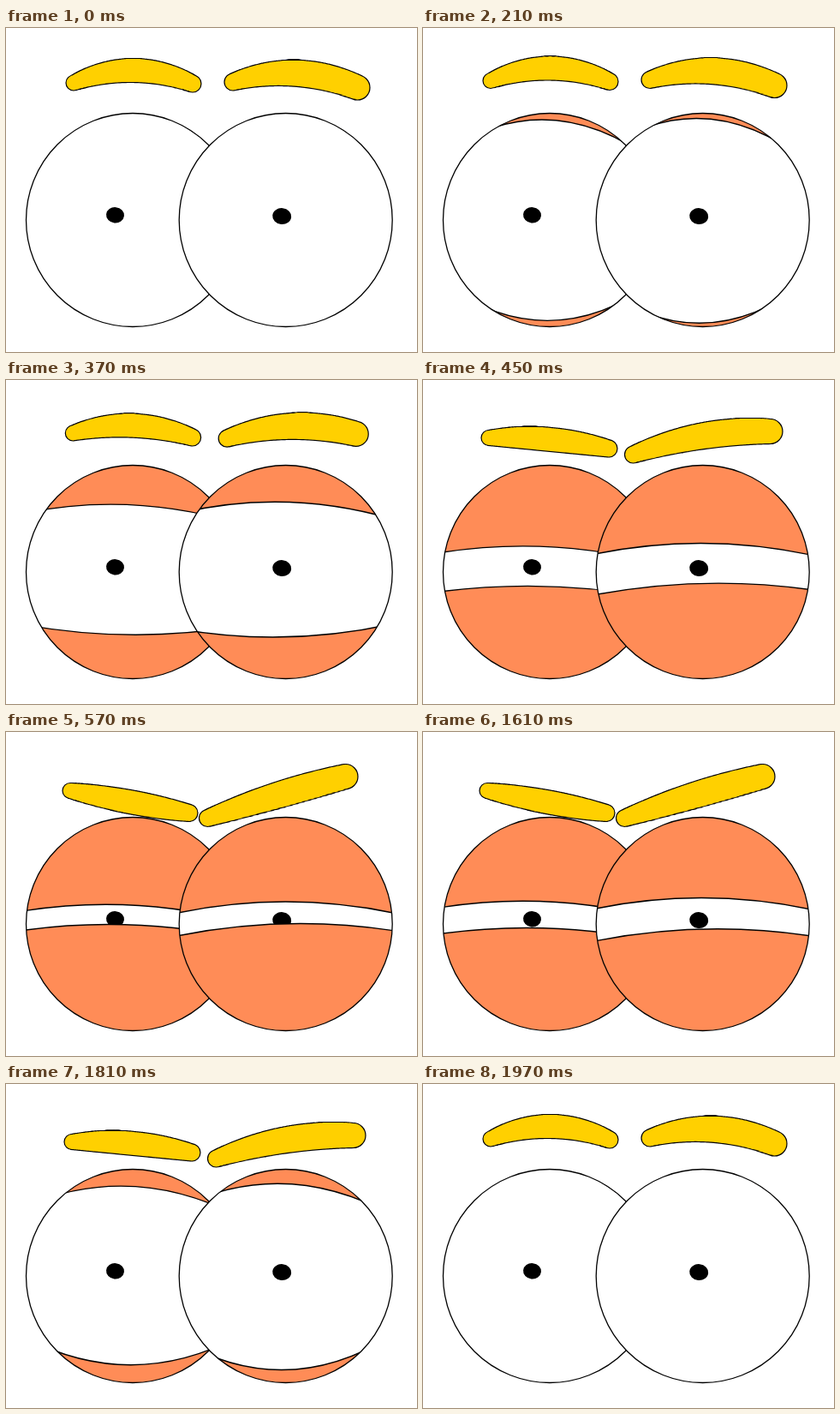
An HTML page with a canvas that plays this animation: 480x378 px, repeating every 2.47 s.

```html
<!DOCTYPE html>
<html lang="en">
<head>
<meta charset="utf-8">
<title>Suspicious eyes</title>
<style>
  html, body { margin: 0; width: 100%; height: 100%; overflow: hidden; background: #fff; }
  canvas { display: block; }
</style>
</head>
<body>
<canvas id="stage" width="480" height="378"></canvas>
<script>
const ctx = document.getElementById("stage").getContext("2d");
const LOOP = 2470, EYE_Y = 224, RADIUS = 124.5;
const SKIN = "#ff8c57", YELLOW = "#ffd000";

const mix = (a, b, k) => a.map((v, i) => v + (b[i] - v) * k);

// Lid heights at the middle of each eye: left upper, left lower, right upper, right lower.
const open = [95, 355, 95, 355];
const peek = [119.5, 327.7, 116.5, 333.5];
const half = [153, 278, 158, 276];
const narrow = [194.7, 240.8, 190.5, 237.3];
const loosen = [198, 229, 193.5, 230];
const squint = [202, 225, 198, 223.7];

// Brow spines, left then right: x0, y0, x1, y1, arch.
const arched = [79, 64, 218, 65, 15, 265, 63, 410.5, 69.5, 13.5];
const raised = arched.map((v, i) => i % 5 % 2 ? v - 5 : v);
const tilted = [77, 67.5, 217, 80, 4.5, 245.5, 87, 405.5, 60, 8];
const frown = [75, 68.5, 214, 94.5, 0, 235.5, 100.5, 396.5, 52, 2];

const poses = [
  [open, arched], [peek, raised], [narrow, tilted], [squint, frown],
  [loosen, frown], [half, frown], [peek, tilted], [open, arched]];

// Start time of each held drawing and its position along the poses.
const steps = [
  [0, 0], [210, .5], [290, 1], [370, 1.35], [410, 1.7], [450, 2], [490, 2.5], [570, 3],
  [1610, 4], [1650, 4.33], [1690, 4.67], [1730, 5], [1770, 6], [1850, 6.5], [1970, 7]];

// A lid edge curves more and tips differently the further it is from the eye's middle.
function drawLid(cx, y, tilt, swing) {
  const distance = Math.abs(y - EYE_Y), d = distance / 106;
  const upper = y < EYE_Y - 5;
  const arch = upper ? 13 + 18 * d ** 6 : 11 - 46 * d ** 2;
  const slope = tilt + swing * distance;
  const left = cx - 126, right = cx + 126, outerY = upper ? 80 : 370;
  ctx.beginPath();
  ctx.moveTo(left, y + arch - slope);
  ctx.quadraticCurveTo(cx, y - arch, right, y + arch + slope);
  ctx.lineTo(right, outerY);
  ctx.lineTo(left, outerY);
  ctx.closePath();
  ctx.fillStyle = SKIN;
  ctx.fill();
  ctx.lineWidth = 1.4;
  ctx.stroke();
}

function drawEye(cx, pupil, drawLids) {
  const ball = new Path2D();
  ball.arc(cx, EYE_Y, RADIUS, 0, Math.PI * 2);
  ctx.save();
  ctx.clip(ball);
  ctx.fillStyle = "#fff";
  ctx.fill(ball);
  ctx.beginPath();
  ctx.ellipse(...pupil, .1, 0, Math.PI * 2);
  ctx.fillStyle = "#000";
  ctx.fill();
  drawLids();
  ctx.restore();
  ctx.lineWidth = 1.3;
  ctx.stroke(ball);
}

// A brow is a row of circles along an arched spine, thickest near the middle.
function drawBrow([x0, y0, x1, y1, arch], r0, r1, bulge) {
  const shape = new Path2D();
  for (let i = 0; i <= 160; i++) {
    const t = i / 160, hump = 4 * t * (1 - t);
    const x = x0 + (x1 - x0) * t, y = y0 + (y1 - y0) * t - arch * hump;
    const r = r0 + (r1 - r0) * t + bulge * hump - .6;
    shape.moveTo(x + r, y);
    shape.arc(x, y, r, 0, Math.PI * 2);
  }
  // The fill hides every line inside the shape and leaves only its outline.
  ctx.lineWidth = 2.4;
  ctx.stroke(shape);
  ctx.fillStyle = YELLOW;
  ctx.fill(shape);
}

function draw(time) {
  const position = steps.findLast(([start]) => start <= time)[1];
  const index = Math.floor(position), k = position - index;
  const from = poses[index], to = poses[Math.min(index + 1, poses.length - 1)];
  const lids = mix(from[0], to[0], k), brows = mix(from[1], to[1], k);

  ctx.fillStyle = "#fff";
  ctx.fillRect(0, 0, 480, 378);
  ctx.strokeStyle = "#000";
  drawEye(148, [127.5, 218.3, 10.5, 9.2], () => {
    drawLid(148, lids[0], 6.5, 0);
    drawLid(148, lids[1], 5, -.06);
  });
  drawEye(326.7, [322.2, 219.6, 11, 9.5], () => {
    drawLid(326.7, lids[2], -1.5, .06);
    drawLid(326.7, lids[3], -3, 0);
  });
  drawBrow(brows.slice(0, 5), 9, 10, 4.5);
  drawBrow(brows.slice(5), 10, 14.5, 3.2);
}

const began = performance.now();
function tick() {
  draw((performance.now() - began) % LOOP);
  requestAnimationFrame(tick);
}
tick();
</script>
</body>
</html>
```
